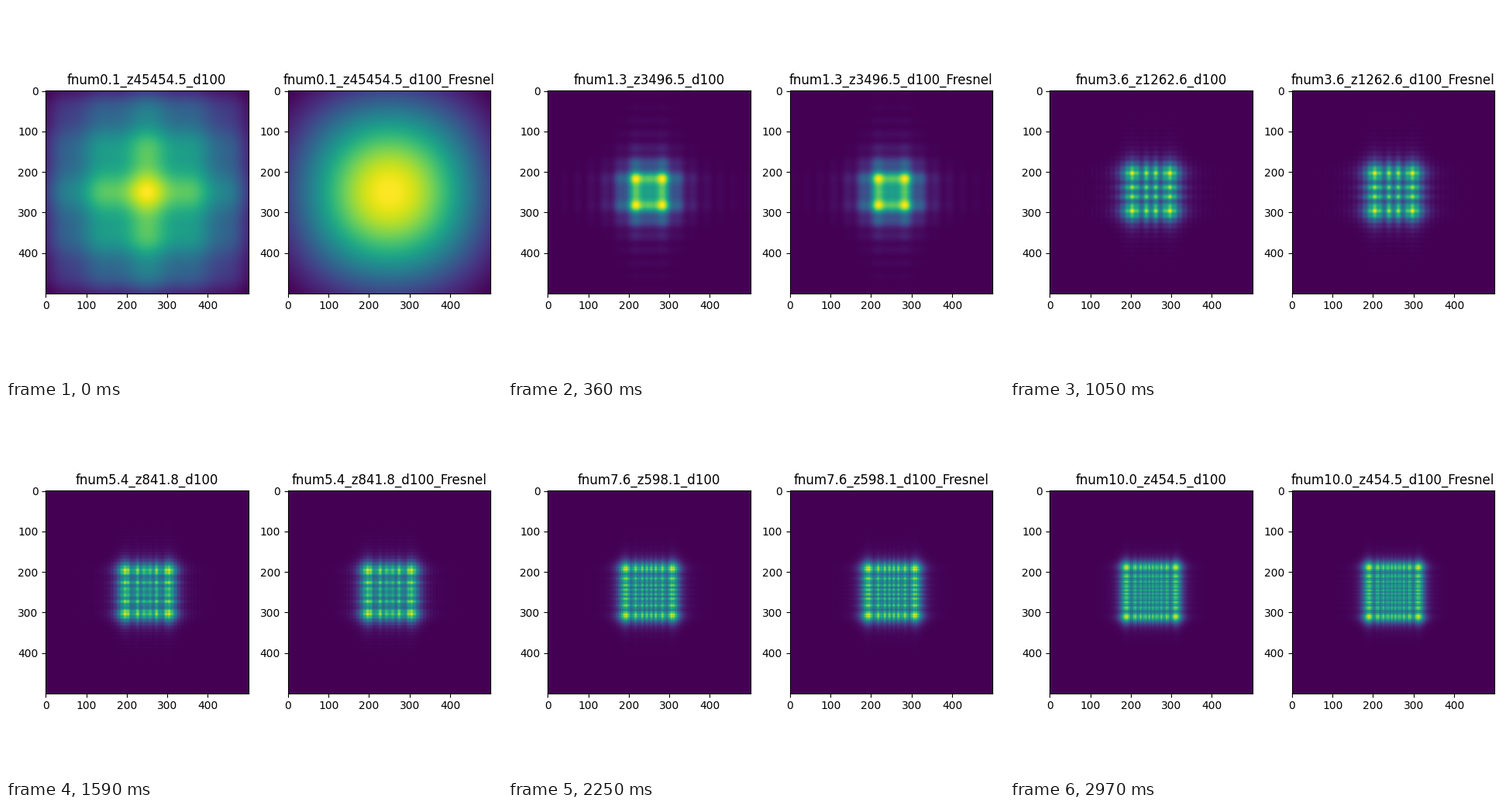
Animation, 640 px wide and 480 px high, one loop 3 s. Source, as a matplotlib script:

```python
import numpy as np
import matplotlib.pyplot as plt
from matplotlib.animation import FuncAnimation

# Near-field diffraction of a square aperture, lengths in micrometres
FRAMES = 100
SIZE = 500
WIDTH = 300.0
APERTURE = 100.0
WAVELENGTH = 0.55

dx = WIDTH / SIZE
x = (np.arange(SIZE) - (SIZE - 1) / 2) * dx
slit = (np.abs(x) <= APERTURE / 2).astype(float)

# Zero-padded spectrum of the slit
pad = SIZE // 2
freq = np.fft.fftfreq(2 * SIZE, dx)
spectrum = np.fft.fft(np.pad(slit, pad))
source = x[slit > 0]
sq_dist = (x[:, None] - source[None, :]) ** 2


def distance(fnum):
    return (APERTURE / 2) ** 2 / (WAVELENGTH * fnum)


def angular_spectrum(z):
    """Intensity along one axis, band-limited angular spectrum."""
    limit = 1 / (WAVELENGTH * np.hypot(z / WIDTH, 1))
    kz = 2 * np.pi * np.sqrt(1 / WAVELENGTH ** 2 - freq ** 2)
    transfer = np.exp(1j * kz * z) * (np.abs(freq) <= limit)
    field = np.fft.ifft(spectrum * transfer)[pad:pad + SIZE]
    return np.abs(field) ** 2


def fresnel(z):
    """Intensity along one axis, direct Fresnel integral."""
    field = np.exp(1j * np.pi * sq_dist / (WAVELENGTH * z)).sum(axis=1) * dx
    return np.abs(field) ** 2 / (WAVELENGTH * z)


plt.rcParams["font.family"] = "DejaVu Sans"
fig, axes = plt.subplots(1, 2, figsize=(6.4, 4.8), dpi=100)
images = [ax.imshow(np.zeros((SIZE, SIZE)), cmap="viridis") for ax in axes]


def update(i):
    fnum = (i + 1) / 10
    z = distance(fnum)
    label = f"fnum{fnum:.1f}_z{z:.1f}_d{APERTURE:.0f}"
    profiles = (angular_spectrum(z), fresnel(z))
    for ax, im, p, suffix in zip(axes, images, profiles, ("", "_Fresnel")):
        im.set_data(np.outer(p, p))
        im.autoscale()
        ax.set_title(label + suffix)
    return images


update(0)
fig.tight_layout()
anim = FuncAnimation(fig, update, frames=FRAMES, init_func=lambda: update(0),
                     interval=30, repeat=True, repeat_delay=0, blit=False)
plt.show()
```
